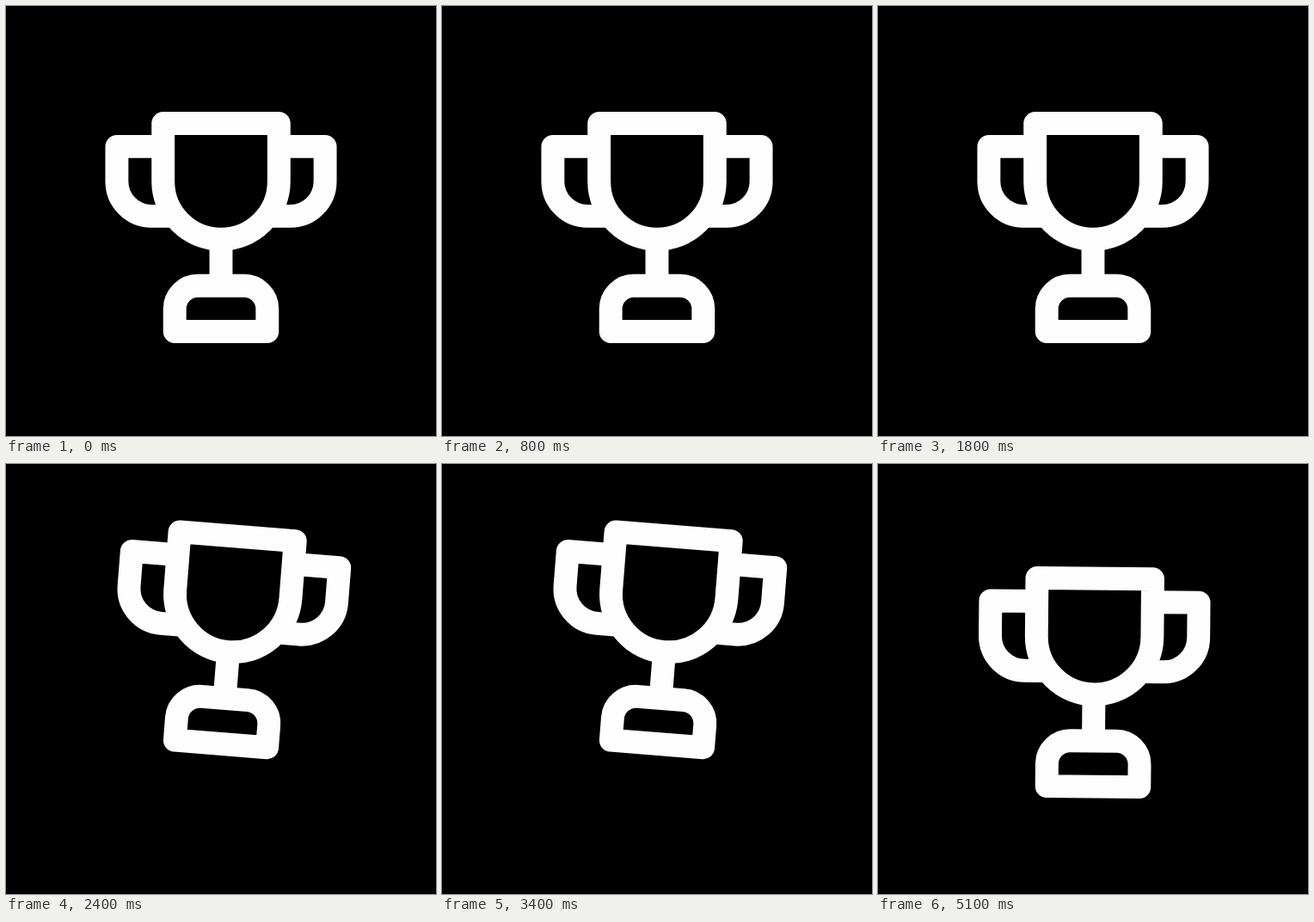
Write an HTML page that moves like this. It is 500 px wide and 500 px high and loops after 5130 ms.

```html
<!DOCTYPE html>
<html lang="en">
<head>
<meta charset="utf-8">
<title>Trophy</title>
<style>
  html, body { margin: 0; height: 100%; overflow: hidden; background: #000; }
  svg { display: block; width: 100vw; height: 100vh; }
  path { fill: none; stroke: #fdfdfd; stroke-width: 26.9; stroke-linejoin: round; }
</style>
</head>
<body>
<svg viewBox="0 0 500 500">
  <g id="trophy">
    <path d="M182.7 136.5H317.3V204A67.3 67.3 0 0 1 182.7 204Z"/>
    <path d="M182 163.4H128.9V204A40.4 40.4 0 0 0 169.3 244.4H191"/>
    <path d="M318 163.4H371.1V204A40.4 40.4 0 0 1 330.7 244.4H309"/>
    <path d="M250 271V325"/>
    <path d="M196.2 378.5V352.2A26.9 26.9 0 0 1 223.1 325.3H276.9A26.9 26.9 0 0 1 303.8 352.2V378.5Z"/>
  </g>
</svg>
<script>
const trophy = document.getElementById('trophy');
const LOOP = 5130, START = 0.25, SPAN = 5;
// Each pose: lift in pixels, tilt in degrees
const poses = [[0, 0], [61.5, 9.7], [30.5, -9.2], [0, 0]];

const easeInOut = x => (1 - Math.cos(Math.PI * x)) / 2;

// Two picture steps per 100 ms, held for 30 and 70 ms
function stepAt(ms) {
  const phase = ms % 1000;
  return 2 * Math.floor(phase / 100) - 1 + (phase % 100 >= 30 ? 1 : 0);
}

function draw(now) {
  const step = stepAt(now % LOOP);
  let lift = 0, tilt = 0;
  if (step > 0 && step < 15) {
    const pos = (step - START) / SPAN, i = Math.floor(pos);
    const e = easeInOut(pos - i);
    [lift, tilt] = poses[i].map((v, j) => v + (poses[i + 1][j] - v) * e);
  }
  trophy.setAttribute('transform', `translate(0 ${-lift}) rotate(${tilt} 250 378.5)`);
  requestAnimationFrame(draw);
}
draw(performance.now());
</script>
</body>
</html>
```
